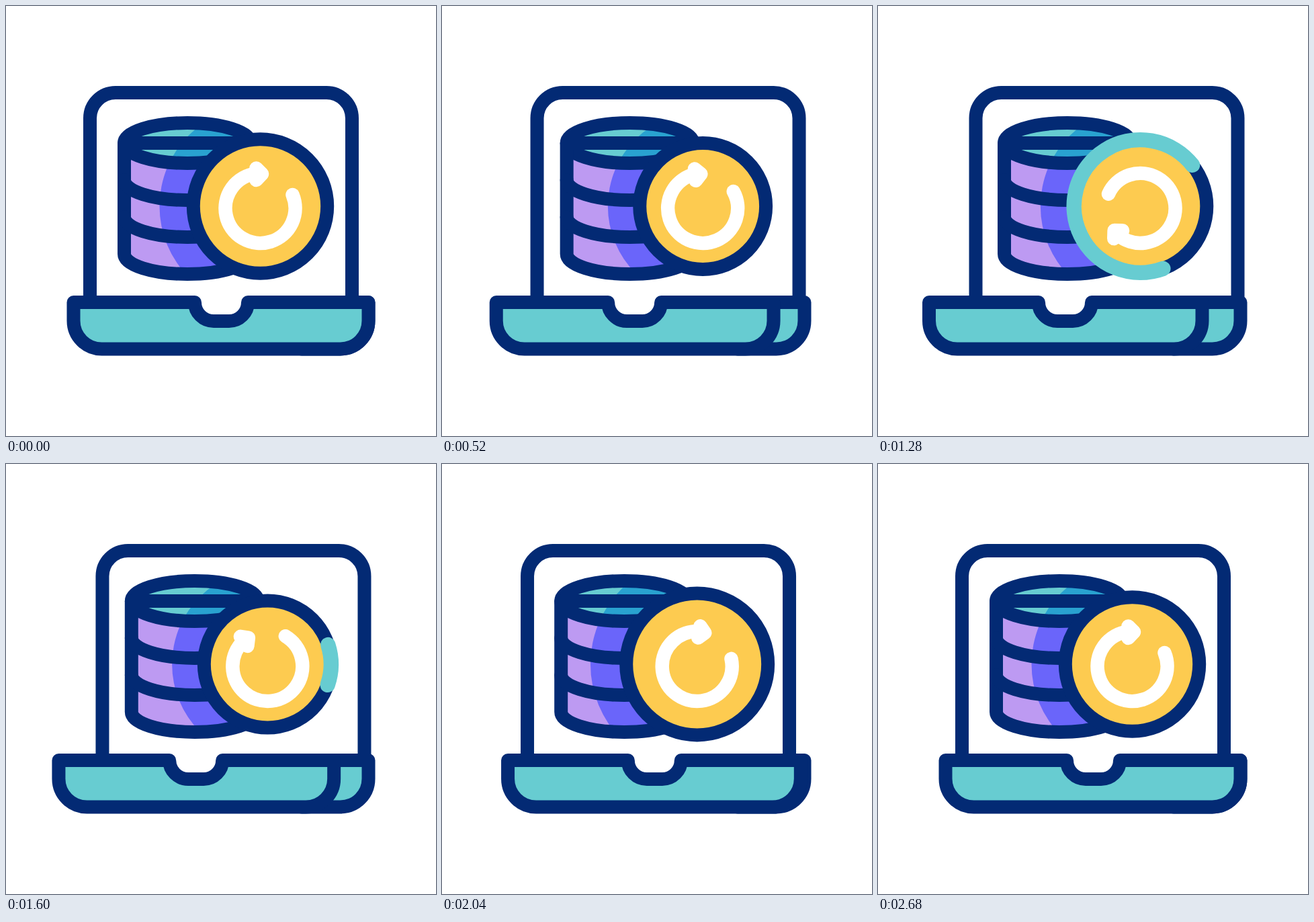
Animation of 640 by 640 pixels, one loop 3000 ms. Source, as an HTML page:

```html
<!DOCTYPE html>
<html lang="en">
<head>
<meta charset="utf-8">
<title>Laptop backup</title>
<style>
  html, body { margin: 0; width: 100%; height: 100%; overflow: hidden; background: #fff; }
  svg { display: block; width: 100vw; height: 100vh; }
  .line { fill: none; stroke: #032a74; stroke-width: 20; stroke-linejoin: round; stroke-linecap: round; }
  .teal { fill: #67ccd1; }
  .white { stroke: #fff; stroke-width: 20.5; stroke-linecap: round; stroke-linejoin: round; }
</style>
</head>
<body>
<svg viewBox="0 0 640 640">
  <defs>
    <path id="body" d="M176 204V369A94 30 0 0 0 364 369V204Z"/>
    <ellipse id="lid" cx="270" cy="204" rx="94" ry="30"/>
    <clipPath id="inBody"><use href="#body"/></clipPath>
    <clipPath id="inLid"><use href="#lid"/></clipPath>
  </defs>

  <path id="screen" class="line" d="M125 441V167A38 38 0 0 1 163 129H477A38 38 0 0 1 515 167V441"/>

  <path class="line teal" d="M470 441H539.5V468.5A42 42 0 0 1 497.5 510.5H440"/>
  <path id="front" class="line teal"/>

  <g id="store">
    <use href="#body" fill="#bd9af2"/>
    <g clip-path="url(#inBody)"><circle class="shade" cx="378.5" cy="298" fill="#6a65fa"/></g>
    <use href="#lid" class="teal"/>
    <g clip-path="url(#inLid)"><circle class="shade" cx="378.5" cy="298" fill="#29a2d0"/></g>
    <use href="#lid" class="line"/>
    <use href="#body" class="line"/>
    <path class="line" d="M176 259A94 30 0 0 0 364 259M176 314A94 30 0 0 0 364 314"/>

    <g transform="translate(378.5 298)">
      <circle id="coin" class="line" style="fill:#fdcb50"/>
      <path id="ring" fill="none" stroke="#67ccd1" stroke-width="22.5" stroke-linecap="round"/>
      <g transform="translate(0 3)">
        <g id="arrow" class="white">
          <path d="M48 -20A52 52 0 1 1 -6.3 -51.6" fill="none"/>
          <path d="M-6 -59.5L2.5 -51L-6 -42Z" fill="#fff"/>
        </g>
      </g>
    </g>
  </g>
</svg>
<script>
const LOOP = 3000;
const $ = id => document.getElementById(id);
const shades = document.querySelectorAll('.shade');

// cubic-bezier(a, 0, b, 1)
const bezier = (a, b) => x => {
  if (x <= 0) return 0;
  if (x >= 1) return 1;
  let lo = 0, hi = 1, u;
  for (let i = 0; i < 24; i++) {
    u = (lo + hi) / 2;
    const at = 3 * u * (1 - u) * ((1 - u) * a + u * b) + u ** 3;
    if (at < x) lo = u; else hi = u;
  }
  return u * u * (3 - 2 * u);
};
const smooth = bezier(1 / 3, 2 / 3);
const slide = bezier(.42, .05);
const spin = bezier(.4, .45);
const chase = bezier(.85, .55);

// keys: [time, value, ease into this key]
const track = keys => t => {
  let [t0, v0] = keys[0];
  for (const [t1, v1, ease = smooth] of keys.slice(1)) {
    if (t < t1) return v0 + (v1 - v0) * ease((t - t0) / (t1 - t0));
    t0 = t1;
    v0 = v1;
  }
  return v0;
};

const shift = track([[20, 0], [1100, 1, slide], [1416, 1], [2496, 0, slide]]);
const pulse = track([[0, 1], [510, .942], [1000, 1.045], [1540, .943], [2040, 1.058], [2560, 1]]);
const turn = track([[0, 0], [420, -9], [2110, 371, spin], [2660, 360]]);
const head = track([[640, 0], [1460, 469]]);
const tail = track([[504, 0], [1834, 469, chase]]);

const polar = (deg, r) => {
  const a = deg * Math.PI / 180;
  return `${r * Math.sin(a)} ${-r * Math.cos(a)}`;
};

function frontPath(p) {
  const left = 100.5 - 24.5 * p, right = 539.5 - 57 * p, notch = 281 - 42 * p;
  return `M${left} 441H${notch}a28 28 0 0 0 28 28h23a28 28 0 0 0 28 -28H${right}` +
    `V468.5a42 42 0 0 1 -42 42H${left + 42}a42 42 0 0 1 -42 -42Z`;
}

function ringPath(from, to, r) {
  if (to - from < .5) return '';
  return `M${polar(from, r)}A${r} ${r} 0 ${to - from > 180 ? 1 : 0} 1 ${polar(to, r)}`;
}

function draw(t) {
  const p = shift(t), s = pulse(t), r = 99.7 * s;
  $('screen').setAttribute('transform', `translate(${20.5 * p} 0)`);
  $('store').setAttribute('transform', `translate(${12 * p} 0)`);
  $('front').setAttribute('d', frontPath(p));
  $('coin').setAttribute('r', r);
  shades.forEach(c => c.setAttribute('r', 150 * s));
  $('ring').setAttribute('d', ringPath(tail(t), head(t), r));
  $('arrow').setAttribute('transform', `rotate(${turn(t)})`);
}

const start = performance.now();
function tick() {
  draw((performance.now() - start) % LOOP);
  requestAnimationFrame(tick);
}
tick();
</script>
</body>
</html>
```
